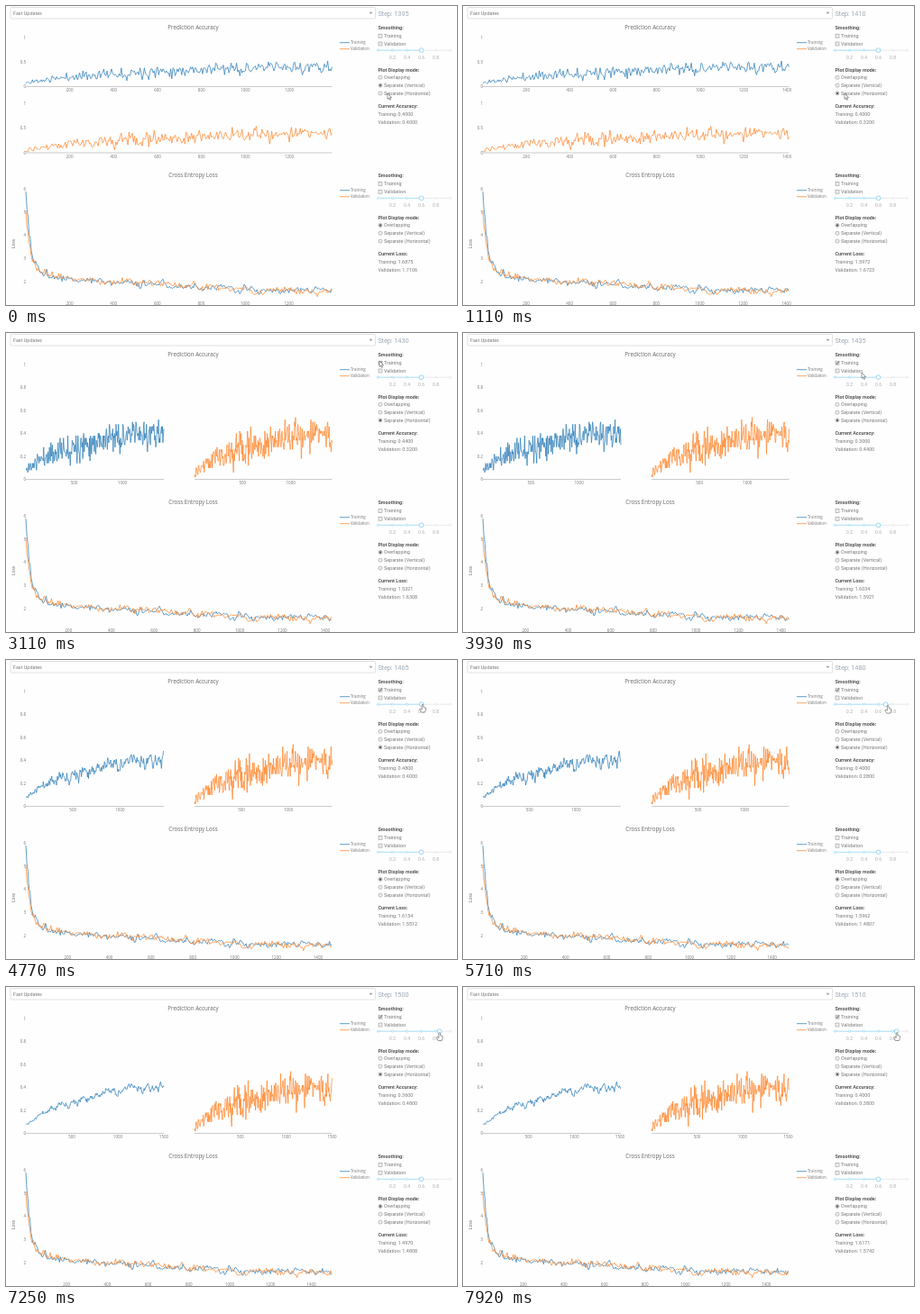
Write an HTML page that moves like this. It is 500 px wide and 332 px high and loops after 8000 ms.

```html
<!DOCTYPE html>
<html lang="en">
<head>
<meta charset="utf-8">
<title>Training dashboard</title>
<style>
  html, body { margin: 0; width: 100%; height: 100%; overflow: hidden; background: #fefefe; }
  svg { display: block; width: 100vw; height: 100vh; }
  text { font: 5.45px Roboto, sans-serif; fill: #777; }
  .head { font-weight: 700; fill: #555; }
  .step { font-size: 7.3px; font-weight: 300; fill: #6f8296; }
  .mark { font-size: 4.9px; fill: #aaa; text-anchor: middle; }
  .title { font: 6.2px "Open Sans", sans-serif; text-anchor: middle; fill: #666; }
  .side { font-size: 5px; }
  .tick, .key { font: 4.5px "Open Sans", sans-serif; }
  .x { text-anchor: middle; }
  .y { text-anchor: end; }
  .box { fill: #eee; stroke: #999; stroke-width: .6; }
  .curve { fill: none; stroke-width: .75; stroke-linejoin: round; }
</style>
</head>
<body>
<svg id="stage" viewBox="0 0 500 332"></svg>
<script>
const LOOP = 8000;
const MODE_CLICK = 1110, MODE_SHOWN = 1550;        // choosing side-by-side plots
const SMOOTH_CLICK = 3110, SMOOTH_LAG = 900;       // ticking the box; plot follows later
const HAND_FROM = 4340;
const STRIDE = 5;                                  // training steps per data point
const BLUE = '#2f7fb8', ORANGE = '#ff8830';
const stage = document.getElementById('stage');

// Key points: time, then values
const stepKeys = [[0, 1395], [2010, 1425], [3930, 1435], [4770, 1465], [6400, 1495], [7920, 1510]];
const cursorKeys = [[1550, 423, 97], [2010, 423, 67], [2700, 414, 31], [3390, 414, 31],
  [3930, 442, 44], [4770, 462, 49], [6400, 478, 51], [7370, 481, 50.5]];

function between(keys, t) {
  const next = keys.findIndex(key => key[0] > t);
  if (next === 0) return keys[0].slice(1);
  if (next < 0) return keys[keys.length - 1].slice(1);
  const from = keys[next - 1], to = keys[next];
  const part = (t - from[0]) / (to[0] - from[0]);
  return from.slice(1).map((v, i) => v + (to[i + 1] - v) * part);
}

const stepAt = t => Math.floor(between(stepKeys, t)[0] / STRIDE) * STRIDE;

// The slider snaps to 0.05 and is dragged right from 0.6
const sliderAt = t => Math.max(0.6, Math.round((between(cursorKeys, t)[0] - 414) / 4) / 20);

const smoothingAt = t => t < SMOOTH_CLICK ? 0 : sliderAt(t);

function generator(seed) {
  return () => {
    seed = (seed + 0x6D2B79F5) | 0;
    let h = Math.imul(seed ^ (seed >>> 15), 1 | seed);
    h = (h + Math.imul(h ^ (h >>> 7), 61 | h)) ^ h;
    return ((h ^ (h >>> 14)) >>> 0) / 4294967296;
  };
}

// Trend plus bell-shaped noise that partly carries over to the next point
function makeSeries(seed, carry, trend, spread) {
  const random = generator(seed);
  let noise = 0;
  return Array.from({ length: 303 }, (_, i) => {
    const bell = random() + random() + random() + random() - 2;
    noise = noise * carry + bell;
    return trend(i * STRIDE) + noise * spread(i * STRIDE);
  });
}

const accuracy = (seed, start, rise, pace, spread) =>
  makeSeries(seed, 0.1, s => start + rise * (1 - Math.exp(-s / pace)), s => spread * Math.min(1, 0.35 + s / 600))
    .map(v => Math.max(0.02, Math.round(v * 50) / 50));

const loss = (seed, drop) =>
  makeSeries(seed, 0.5,
    s => 1.45 + 0.9 * Math.exp(-s / 800) + drop * Math.exp(-s / 22),
    s => 0.13 + (s ? 0.25 * Math.exp(-s / 60) : 0));

const trainAccuracy = accuracy(11, 0.08, 0.34, 500, 0.105);
const validAccuracy = accuracy(29, 0.07, 0.35, 600, 0.12);
const trainLoss = loss(5, 3.5);
const validLoss = loss(83, 2.7);

function smooth(values, weight) {
  let last = values[0];
  return values.map(v => last = last * weight + v * (1 - weight));
}

const text = (cls, x, y, s) => `<text class="${cls}" x="${x}" y="${y}">${s}</text>`;
const line = (x1, y1, x2, y2, color, width) =>
  `<path d="M${x1} ${y1}L${x2} ${y2}" stroke="${color}" stroke-width="${width}"/>`;

// A plot area: left edge, width, y of zero, pixels per unit
const area = (x, width, zero, unit) => ({ x, width, zero, unit });

function curve(values, step, { x, width, zero, unit }, color) {
  const points = values.slice(0, step / STRIDE + 1).map((v, i) =>
    `${(x + i * STRIDE / step * width).toFixed(2)},${(zero - v * unit).toFixed(2)}`);
  return `<polyline class="curve" points="${points.join(' ')}" stroke="${color}"/>`;
}

function xTicks({ x, width }, step, gap, y) {
  let out = '';
  for (let s = gap; s <= step; s += gap) out += text('tick x', x + s / step * width, y, s);
  return out;
}

function yTicks({ x, zero, unit }, from, to, gap) {
  let out = '';
  for (let v = from; v < to + gap / 2; v += gap) out += text('tick y', x, zero - v * unit + 1.7, +v.toFixed(1));
  return out;
}

function plotHead(title, y) {
  const entry = (top, color, label) => line(370, top, 381, top, color, 0.75) + text('key', 382, top + 1.6, label);
  return text('title', 207.5, y, title) + entry(y + 14.5, BLUE, 'Training') + entry(y + 21.5, ORANGE, 'Validation');
}

function accuracyPlot(step, sideBySide, weight) {
  const [left, right] = sideBySide
    ? [area(22, 153, 162.5, 127.5), area(209, 152.5, 162.5, 127.5)]
    : [area(22, 339.5, 89.5, 54.5), area(22, 339.5, 163, 54.5)];
  const frame = a => line(a.x, a.zero, a.x + a.width, a.zero, '#aaa', 0.6) +
    xTicks(a, step, sideBySide ? 500 : 200, a.zero + 5.6);
  return plotHead('Prediction Accuracy', 26.2) + frame(left) + frame(right) +
    yTicks(left, 0, 1, sideBySide ? 0.2 : 0.5) + (sideBySide ? '' : yTicks(right, 0, 1, 0.5)) +
    curve(smooth(trainAccuracy, weight), step, left, BLUE) + curve(validAccuracy, step, right, ORANGE);
}

function lossPlot(step) {
  const plot = area(22, 339, 357.7, 25.75);
  return plotHead('Cross Entropy Loss', 190.2) +
    '<text class="title side" transform="translate(9.5 264) rotate(-90)">Loss</text>' +
    xTicks(plot, step, 200, 331.6) + yTicks(plot, 2, 6, 1) +
    curve(trainLoss, step, plot, BLUE) + curve(validLoss, step, plot, ORANGE);
}

function checkbox(y, label, checked) {
  return `<rect class="box" x="413" y="${y - 2}" width="4" height="4"/>` +
    (checked ? `<path d="M413.7 ${y}l1 1.2l2-2.8" fill="none" stroke="#333" stroke-width=".8"/>` : '') +
    text('', 419, y + 2, label);
}

function radio(y, label, checked) {
  return `<circle class="box" cx="415" cy="${y}" r="2.1"/>` +
    (checked ? `<circle cx="415" cy="${y}" r="1.2" fill="#555"/>` : '') + text('', 419, y + 2, label);
}

function slider(y, value) {
  const at = v => 412.5 + 80 * v;
  const dot = (v, r, color) => `<circle cx="${at(v)}" cy="${y}" r="${r}" fill="#fff" stroke="${color}" stroke-width=".8"/>`;
  let out = line(at(0), y, at(1), y, '#e9e9e9', 0.9) + line(at(0), y, at(value), y, '#abe2fb', 0.9);
  for (let i = 0; i <= 5; i++) {
    out += dot(i / 5, 1.1, i / 5 <= value ? '#96dbfa' : '#e4e4e4');
    if (i % 5) out += text('mark', at(i / 5), y + 9.4, i / 5);
  }
  return out + dot(value, 2.4, '#7fd0f5');
}

function panel(top, name, mode, smoothed, value, training, validation) {
  const modes = ['Overlapping', 'Separate (Vertical)', 'Separate (Horizontal)'];
  return `<g transform="translate(0 ${top})">` + text('head', 412.5, 26.3, 'Smoothing:') +
    checkbox(33.2, 'Training', smoothed) + checkbox(42, 'Validation', false) + slider(49.2, value) +
    text('head', 412.5, 72.8, 'Plot Display mode:') +
    modes.map((label, i) => radio(79.3 + 8.8 * i, label, i === mode)).join('') +
    text('head', 412.5, 113, `Current ${name}:`) +
    text('', 412.5, 122, `Training: ${training.toFixed(4)}`) +
    text('', 412.5, 130.8, `Validation: ${validation.toFixed(4)}`) + '</g>';
}

function cursor(t) {
  const hand = 'M-.8 .6Q0-.5.8.6V3.2L3.4 4V6.2L2.4 9H-1.6L-3.4 5.8Q-3.2 4.6-1.8 5.4L-.8 6Z';
  const arrow = 'M0 0V6.4L1.5 5.1L2.5 7.4L3.5 7L2.5 4.7H4.5Z';
  return `<path transform="translate(${between(cursorKeys, t)})" d="${t < HAND_FROM ? arrow : hand}" ` +
    'fill="#fff" stroke="#555" stroke-width=".6" stroke-linejoin="round"/>';
}

const header = '<rect x="5" y="1.5" width="404.5" height="12.5" rx="1" fill="#fff" stroke="#d4d4d4" stroke-width=".7"/>' +
  text('', 8, 9.8, 'Fast Updates') + '<path d="M402.6 6.7h3.8l-1.9 2.2z" fill="#999"/>';

function render(t) {
  const step = stepAt(t), last = step / STRIDE;
  stage.innerHTML = header + text('step', 412.5, 11, `Step: ${step}`) +
    accuracyPlot(step, t >= MODE_SHOWN, smoothingAt(t - SMOOTH_LAG)) + lossPlot(step) +
    panel(0, 'Accuracy', t < MODE_CLICK ? 1 : 2, t >= SMOOTH_CLICK, sliderAt(t), trainAccuracy[last], validAccuracy[last]) +
    panel(164.2, 'Loss', 0, false, 0.6, trainLoss[last], validLoss[last]) + cursor(t);
}

function tick() {
  render(performance.now() % LOOP);
  requestAnimationFrame(tick);
}
tick();
</script>
</body>
</html>
```
